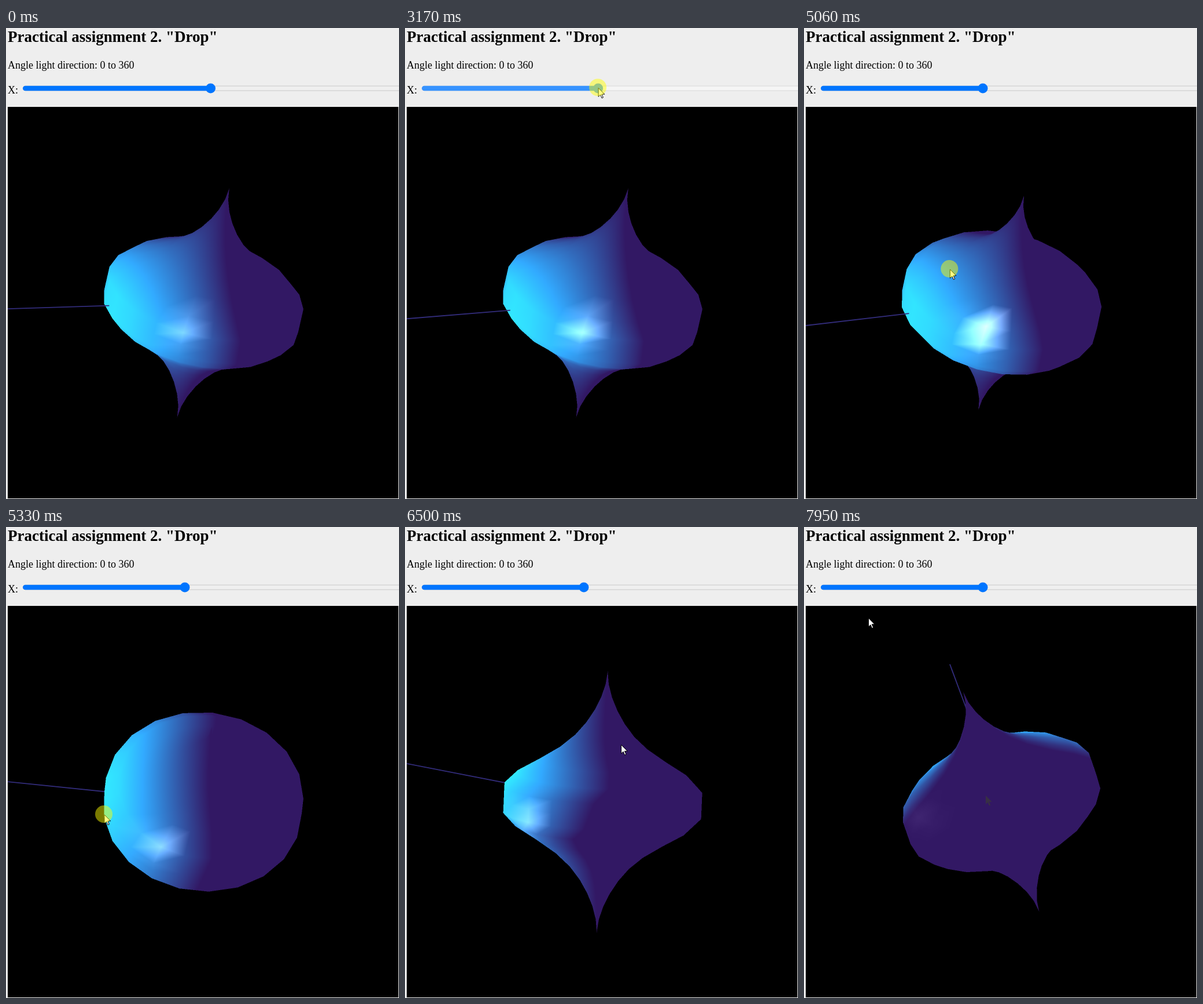
Recreate the animation shown at these times as an HTML page with a canvas. Size 679 by 812 pixels, loop 8 s.

```html
<!DOCTYPE html>
<html lang="en">
<head>
<meta charset="utf-8">
<title>Drop</title>
<style>
html, body { margin: 0; width: 100%; height: 100%; overflow: hidden; background: #eee; }
canvas, svg { position: absolute; left: 0; top: 0; display: block; }
canvas { left: 3px; top: 136px; }
text { font: 18px "Liberation Serif", "Times New Roman", serif; }
.title { font-size: 27px; font-weight: bold; }
</style>
</head>
<body>
<canvas id="view" width="675" height="675"></canvas>
<svg width="679" height="812" viewBox="0 0 679 812">
  <text class="title" x="3" y="24">Practical assignment 2. "Drop"</text>
  <text x="3" y="70">Angle light direction: 0 to 360</text>
  <text x="3" y="113">X:</text>
  <rect id="track" x="29.5" y="100" width="700" height="8" rx="4"/>
  <rect id="fill" x="29" y="99.7" height="8.6" rx="4.3"/>
  <circle id="thumb" cy="104" r="8.5"/>
  <path id="ghost" transform="translate(314 463)" fill="#383044"/>
  <path id="arrow" fill="#fff" stroke="#000" stroke-width="1"/>
  <circle id="press" r="15" fill="#ff0" fill-opacity=".48"/>
</svg>
<script>
const LOOP = 8000, SIZE = 675, MID = SIZE / 2;
const HALF = 228, RADIUS = 172, RINGS = 10, COLS = 21, PHASE = 0.14, LIGHT = 480;
const SS = 2, W = 360 * SS, H = 470 * SS;
const $ = id => document.getElementById(id);

// Each move: start, end, then the values reached; they hold until the next move.
// Values: tip x, y; light angle (deg, up from the left), light depth; highlight x, y, strength
const poses = [
  [0, 0, 45, 197.5, -1.8, 0.4, -25, -47, 0.3],
  [2930, 3570, 45, 197.5, -9.5, 0.5, -25, -47, 0.75],
  [5000, 5330, 14.5, 128.5, 5.8, 0.1, -82, -73, 0.36],
  [5400, 6150, 9.5, 225, 11, -0.1, -132, -28, 0.34],
  [6640, 7050, -54, 174, 54.5, -0.7, -143, -13, 0.4],
  [7050, 7400, -65.5, 189, 69.5, -0.85, -136, -24, 0.05]
];
const pointer = [
  [0, 0, 632, 368], [310, 1050, 354, 103], [1710, 1850, 348, 102], [2930, 3570, 308.5, 103],
  [4650, 5000, 270, 397], [5000, 5330, 169, 495], [5400, 6150, 111, 336],
  [6290, 6640, 545, 400], [6640, 7050, 404, 508], [7050, 7400, 314, 463], [7600, 7950, 110.5, 156]
];
const slides = [[1180, 2270], [2930, 3570], [4170, 4450]];
const drags = [[5000, 6290], [6640, 7400]];

const mix = (a, b, f) => a + (b - a) * f;
const dot = (a, b) => a[0] * b[0] + a[1] * b[1] + a[2] * b[2];
const add = (a, p, b, q) => a.map((v, i) => v * p + b[i] * q);
const norm = a => { const n = Math.hypot(...a); return a.map(v => v / n); };
const cross = (a, b) => [a[1] * b[2] - a[2] * b[1], a[2] * b[0] - a[0] * b[2], a[0] * b[1] - a[1] * b[0]];
const within = (list, t) => list.some(([a, b]) => t >= a && t < b);

function follow(moves, t) {
  let now = moves[0].slice(2);
  for (const [start, end, ...to] of moves.slice(1)) {
    if (t < start) break;
    const f = Math.min(1, (t - start) / (end - start));
    now = now.map((v, i) => mix(v, to[i], f));
  }
  return now;
}

// Two thin tips around a full belly
function radius(h) {
  const z = Math.abs(h) / HALF;
  return RADIUS * Math.min(1, (1 - z) ** 1.8 * (1 + 2.5 * z * Math.exp(-((z / 0.28) ** 2))));
}

const ctx = $("view").getContext("2d");
const buf = document.createElement("canvas");
buf.width = W; buf.height = H;
const bctx = buf.getContext("2d");
const image = bctx.createImageData(W, H), data = image.data;
const depth = new Float32Array(W * H);

function triangle(a, b, c) {
  const area = (b.x - a.x) * (c.y - a.y) - (b.y - a.y) * (c.x - a.x);
  if (Math.abs(area) < 1e-6) return;
  const x0 = Math.ceil(Math.min(a.x, b.x, c.x)), x1 = Math.floor(Math.max(a.x, b.x, c.x));
  const y0 = Math.ceil(Math.min(a.y, b.y, c.y)), y1 = Math.floor(Math.max(a.y, b.y, c.y));
  for (let y = y0; y <= y1; y++) {
    for (let x = x0; x <= x1; x++) {
      const u = ((x - a.x) * (c.y - a.y) - (y - a.y) * (c.x - a.x)) / area;
      const v = ((b.x - a.x) * (y - a.y) - (b.y - a.y) * (x - a.x)) / area;
      const w = 1 - u - v;
      if (u < 0 || v < 0 || w < 0) continue;
      const z = w * a.z + u * b.z + v * c.z, i = y * W + x;
      if (z <= depth[i]) continue;
      depth[i] = z;
      const d = Math.max(0, w * a.d + u * b.d + v * c.d);
      const s = 255 * (w * a.s + u * b.s + v * c.s);
      data[i * 4] = 50 + s;
      data[i * 4 + 1] = 24 + 205 * d + s;
      data[i * 4 + 2] = 100 + 218 * d + s;
      data[i * 4 + 3] = 255;
    }
  }
}

function buildMesh(axis, sun, spotX, spotY, shine) {
  const left = [-1, 0, 0];
  const across = norm(add(left, 1, axis, -dot(left, axis))), side = cross(axis, across);
  const mesh = [];
  for (let i = -RINGS; i <= RINGS; i++) {
    const h = HALF * i / RINGS, r = radius(h);
    const slope = (radius(Math.min(HALF, h + 12)) - radius(Math.max(-HALF, h - 12))) / 24;
    mesh.push(Array.from({ length: COLS }, (_, j) => {
      const phi = PHASE + j * 2 * Math.PI / COLS;
      const out = add(across, Math.cos(phi), side, Math.sin(phi));
      const p = add(out, r, axis, h), n = add(out, 1, axis, -slope);
      const far = Math.hypot(p[0] - spotX, p[1] - spotY);
      return {
        x: W / 2 + p[0] * SS, y: H / 2 - p[1] * SS, z: p[2],
        d: dot(n, sun) * r / RADIUS,
        s: n[2] > 0 ? Math.exp(-((far / 22) ** 2)) : 0
      };
    }));
  }
  // The vertex nearest the highlight always gets its full strength
  const all = mesh.flat(), peak = Math.max(1e-3, ...all.map(v => v.s));
  all.forEach(v => v.s *= shine / peak);
  return mesh;
}

function ray(sun, end) {
  ctx.strokeStyle = "#322c7a";
  ctx.lineWidth = 1.8;
  ctx.beginPath();
  ctx.moveTo(MID + sun[0] * LIGHT, MID - sun[1] * LIGHT);
  ctx.lineTo(MID + sun[0] * end, MID - sun[1] * end);
  ctx.stroke();
}

let last = "";
function drawScene(t) {
  const pose = follow(poses, t), key = pose.join();
  if (key === last) return;
  last = key;

  const [tx, ty, angle, lz, ...spot] = pose;
  const axis = norm([tx, ty, Math.sqrt(HALF * HALF - tx * tx - ty * ty)]);
  const flat = Math.sqrt(1 - lz * lz), turn = angle * Math.PI / 180;
  const sun = [-flat * Math.cos(turn), flat * Math.sin(turn), lz];

  data.fill(0);
  depth.fill(-1e4);
  const mesh = buildMesh(axis, sun, ...spot);
  for (let i = 0; i < mesh.length - 1; i++) {
    for (let j = 0; j < COLS; j++) {
      const k = (j + 1) % COLS, a = mesh[i][j], c = mesh[i + 1][k];
      triangle(a, mesh[i][k], c);
      triangle(a, c, mesh[i + 1][j]);
    }
  }
  bctx.putImageData(image, 0, 0);

  ctx.fillStyle = "#000";
  ctx.fillRect(0, 0, SIZE, SIZE);
  const front = lz > 0.15;
  if (!front) ray(sun, 0);
  ctx.drawImage(buf, MID - W / SS / 2, MID - H / SS / 2, W / SS, H / SS);
  if (front) ray(sun, 177);
}

function set(id, attrs) {
  for (const k in attrs) $(id).setAttribute(k, attrs[k]);
}
const show = (id, on) => set(id, { visibility: on ? "visible" : "hidden" });

function drawPage(t) {
  const [px, py] = follow(pointer, t);
  const x = t < 4650 ? Math.min(353.5, px + 0.5) : 309;
  const active = within(slides, t), blue = active ? "#3793ff" : "#0075ff";
  set("track", { fill: active ? "#f5f5f5" : "#efefef", stroke: active ? "#d8d8d8" : "#c8c8c8" });
  set("fill", { width: x - 29, fill: blue });
  set("thumb", { cx: x, fill: blue });
  set("arrow", { transform: `translate(${px + 1} ${py + 1})` });
  set("press", { cx: px, cy: py });
  show("arrow", t >= 70);
  show("press", active || within(drags, t));
  show("ghost", t >= 7670);
}

const shape = "M0 0V15L3.5 11.7L6 17.5L8.3 16.5L5.8 10.8H10.6Z";
set("arrow", { d: shape });
set("ghost", { d: shape });

const start = performance.now();
function frame() {
  const t = (performance.now() - start) % LOOP;
  drawScene(t);
  drawPage(t);
  requestAnimationFrame(frame);
}
frame();
</script>
</body>
</html>
```
